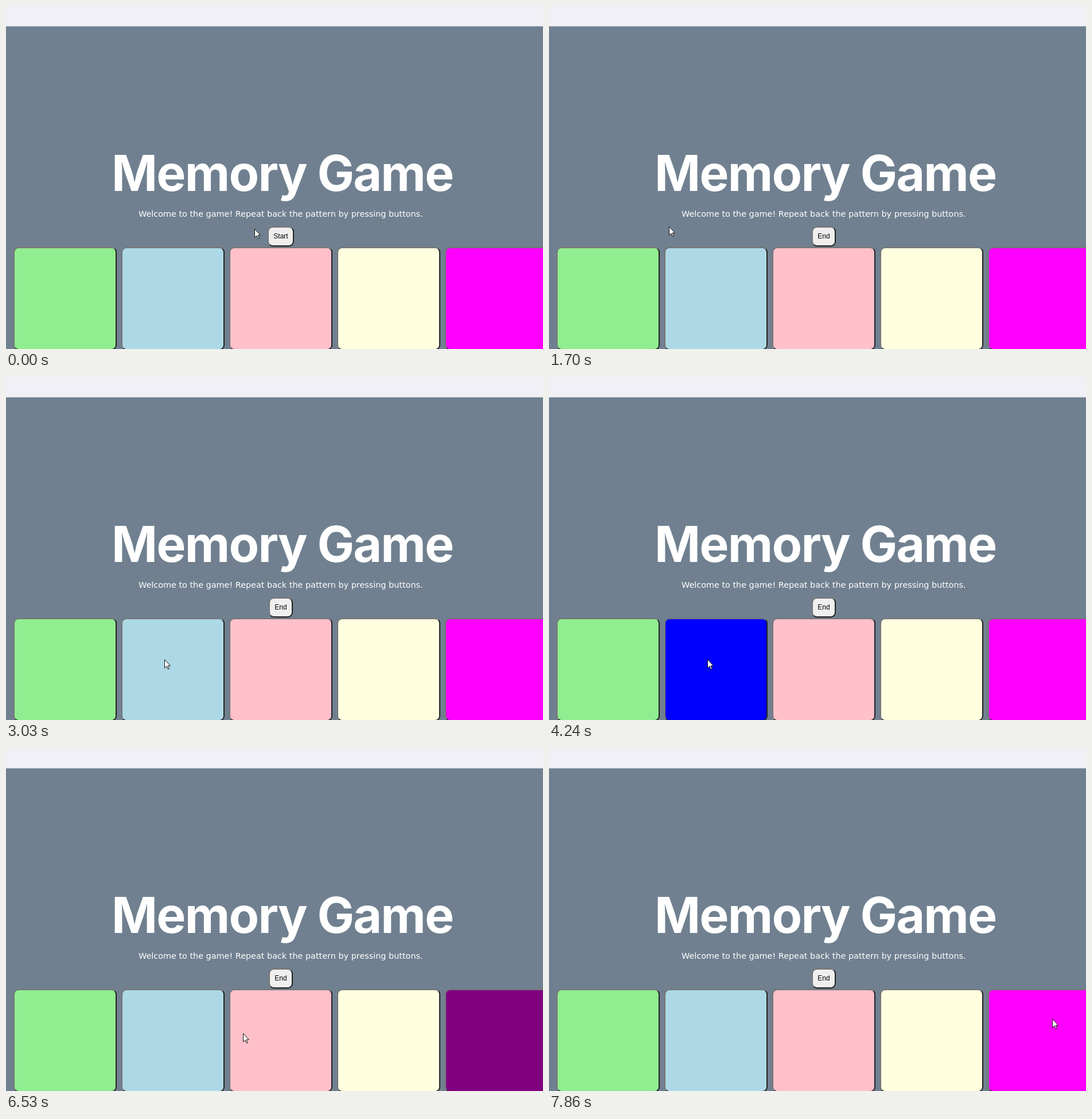
Animation of 936x599 px, one loop 8000 ms. Source, as an HTML page:

```html
<!DOCTYPE html>
<html lang="en">
<head>
<meta charset="utf-8">
<title>Memory Game</title>
<style>
  html, body { margin: 0; width: 100%; height: 100%; overflow: hidden; }
  body { position: relative; background: linear-gradient(#f1f0f7 35px, #708090 36px); color: #fff; }
  body > * { position: absolute; box-sizing: border-box; margin: 0; white-space: nowrap; }
  h1 { left: 184px; top: 238px; font: 700 86px/108px Inter, sans-serif; letter-spacing: -1.8px; }
  p { left: 231px; top: 353px; font: 14.4px/20px "DejaVu Sans", sans-serif; }
  .key { border: 2px solid; border-color: #767676 #212121 #212121 #767676; border-radius: 9px; }
  .key.down { border-color: #212121 #767676 #767676 #212121; }
  .card { top: 421px; width: 180px; height: 180px; }
  #toggle {
    left: 0; right: -22px; top: 385px; width: fit-content; height: 35px;
    margin: auto; padding: 0 8px; background: #efefef; color: #000;
    font: 12px/31px "Liberation Sans", Arial, sans-serif;
  }
  #cursor { left: 0; top: 0; overflow: visible; }
</style>
</head>
<body>
<h1>Memory Game</h1>
<p>Welcome to the game! Repeat back the pattern by pressing buttons.</p>
<div id="toggle" class="key"></div>
<svg id="cursor" width="12" height="19">
  <path d="M.5 .5V15.2L3.9 12 6.2 17.3 8.3 16.4 6 11.2H10.4Z" fill="#fff" stroke="#111"/>
</svg>
<script>
const LOOP = 8000, WAIT = 1000, HOLD = 1000, PAUSE = 340;
const START_DOWN = 690, START_UP = 790;
const BLUE = 1, MAGENTA = 4;
const toggle = document.getElementById('toggle');
const cursor = document.getElementById('cursor');

const colors = [
  ['lightgreen', 'green'], ['lightblue', 'blue'], ['pink', 'red'],
  ['lightyellow', 'yellow'], ['magenta', 'purple']
];
const cards = colors.map((_, i) => {
  const card = document.createElement('div');
  card.className = 'key card';
  card.style.left = 13 + 188 * i + 'px';
  document.body.insertBefore(card, cursor);
  return card;
});

// Player's presses: card, time down, time up
const presses = [
  { card: BLUE, from: 3120, to: 3240 },
  { card: BLUE, from: 7530, to: 7620 }
];

// A round lights its cards in turn, one WAIT after the click that begins it
const round = (click, ...pattern) => pattern.map((card, i) => {
  const from = click + WAIT + i * (HOLD + PAUSE);
  return { card, from, to: from + HOLD };
});
const clues = [...round(START_UP, BLUE), ...round(presses[0].to, BLUE, MAGENTA)];

// Eased pointer moves: from time, to time, x, y; it rests in between
const home = [433, 389];
const moves = [
  [0, 200, 412, 393], [200, 680, 478, 401],
  [1070, 1310, 300, 525], [1310, 1550, 209, 385],
  [1700, 2950, 276, 493],
  [6330, 6850, 690, 508], [6850, 7430, 321, 503],
  [7620, 7860, 877, 473]
];

function pointer(t) {
  let [x, y] = home;
  for (const [from, to, toX, toY] of moves) {
    const u = Math.min(1, Math.max(0, (t - from) / (to - from)));
    const e = u * u * (3 - 2 * u);
    x += (toX - x) * e;
    y += (toY - y) * e;
  }
  return [Math.round(x), Math.round(y)];
}

const active = (spans, card, t) => spans.some(s => s.card === card && t >= s.from && t < s.to);

function draw(t) {
  toggle.textContent = t < START_UP ? 'Start' : 'End';
  toggle.classList.toggle('down', t >= START_DOWN && t < START_UP);
  cards.forEach((card, i) => {
    const down = active(presses, i, t);
    card.classList.toggle('down', down);
    card.style.background = colors[i][+(down || active(clues, i, t))];
  });
  const [x, y] = pointer(t);
  cursor.style.transform = `translate(${x}px, ${y}px)`;
}

let origin;
function tick(now) {
  origin ??= now;
  draw((now - origin) % LOOP);
  requestAnimationFrame(tick);
}
draw(0);
requestAnimationFrame(tick);
</script>
</body>
</html>
```
